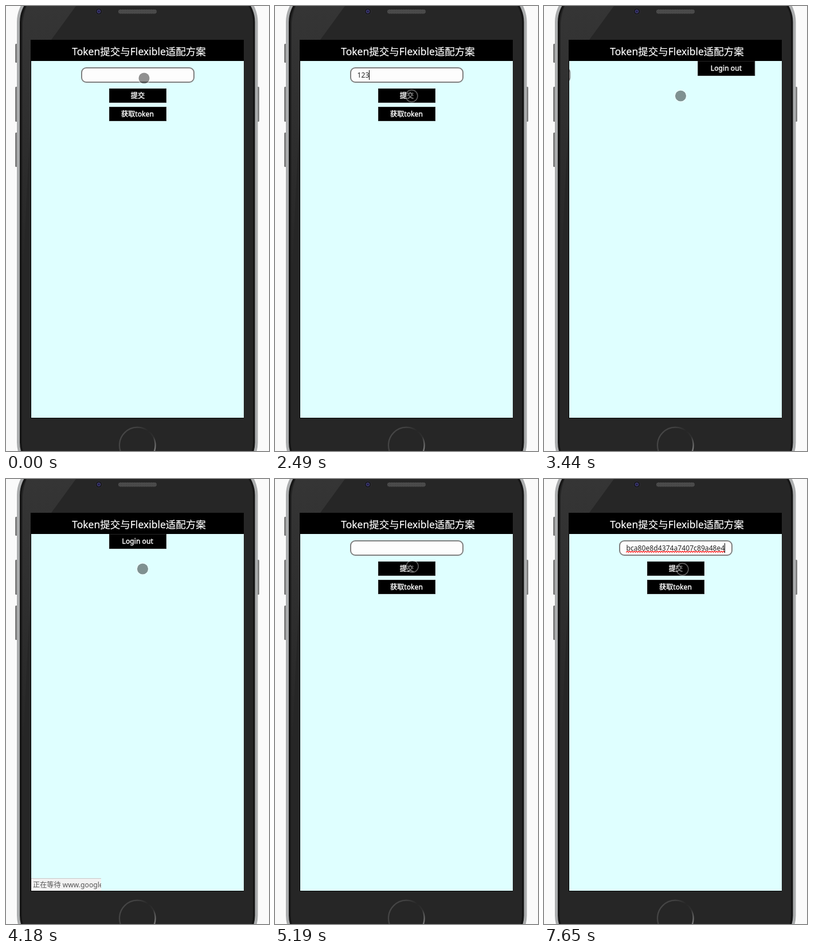
An HTML page that plays this animation: 459x777 px, repeating every 8 s.

```html
<!DOCTYPE html>
<html lang="zh">
<head>
<meta charset="utf-8">
<style>
html, body { margin: 0; width: 100%; height: 100%; overflow: hidden; background: #fafafa; }
svg { display: block; width: 459px; height: 777px; }
text { font: 12.15px "Noto Sans", "Noto Sans CJK SC", "Noto Sans CJK", sans-serif; white-space: pre; }
.title { font-size: 17.5px; fill: #fff; stroke: #fff; stroke-width: .2; text-anchor: middle; }
.button rect { fill: #000; stroke: #262626; }
.button text { fill: #fff; stroke: #fff; stroke-width: .4; text-anchor: middle; }
</style>
</head>
<body>
<svg viewBox="0 0 459 777">
  <defs>
    <linearGradient id="gloss" x1="0" y1="0" x2="0" y2="1">
      <stop stop-color="#353535"/><stop offset="1" stop-color="#262626"/>
    </linearGradient>
    <linearGradient id="ring" x1="0" y1=".15" x2="1" y2=".65">
      <stop stop-color="#484848"/><stop offset=".35" stop-color="#404040"/>
      <stop offset=".62" stop-color="#262626"/><stop offset=".8" stop-color="#303030"/>
      <stop offset="1" stop-color="#858585"/>
    </linearGradient>
    <pattern id="mesh" width="3" height="3" patternUnits="userSpaceOnUse">
      <path d="M0 0h3v3H0z" fill="#505050"/><path d="M0 0h1v1H0zM1.5 1.5h1v1h-1z" fill="#333"/>
    </pattern>
    <clipPath id="screen"><path d="M44 96H415V719H44z"/></clipPath>
    <clipPath id="statusBox"><path d="M44 697H166V719H44z"/></clipPath>
  </defs>

  <g fill="#7c7c7c">
    <rect x="16" y="66" width="5" height="33" rx="1.5"/>
    <rect x="16" y="141" width="5" height="61" rx="1.5"/>
    <rect x="16" y="221" width="5" height="60" rx="1.5"/>
    <rect x="438" y="141" width="4" height="61" rx="1.5"/>
  </g>
  <rect x="19" y="-34" width="420.5" height="858" rx="62" fill="#aaacad"/>
  <rect x="24" y="-29" width="410.5" height="848" rx="57" fill="#161616"/>
  <rect x="27.5" y="-26" width="403.5" height="842" rx="54" fill="#262626"/>
  <path d="M36 0H122L79 59L44 110V190Q37 300 34 380L29 480V30Q31 12 36 0" fill="url(#gloss)"/>
  <circle cx="162" cy="9.5" r="6" fill="#1b1b1f" stroke="#303034"/>
  <circle cx="162" cy="9.5" r="2.6" fill="#22204a" stroke="#4d4790"/>
  <rect x="196" y="6" width="67" height="7.5" rx="3.7" fill="url(#mesh)"/>
  <circle cx="229.3" cy="767" r="31.3" fill="none" stroke="url(#ring)" stroke-width="2.2"/>

  <path d="M43 59H415V720H43z"/>
  <path d="M44 96H415V719H44z" fill="#dfffff"/>
  <text class="title" x="232" y="86">Token提交与Flexible适配方案</text>

  <g clip-path="url(#screen)">
    <g id="pages">
      <rect x="132" y="108" width="196" height="25" rx="8" fill="#fdfdfd" stroke="#808080" stroke-width="2"/>
      <path id="squiggle" fill="none" stroke="#f00" stroke-width="1.2"/>
      <text id="field" x="143.5" y="125" fill="#222"></text>
      <path id="caret" d="M.5 112V129" stroke="#000"/>
      <g class="button"><rect x="180.5" y="144.5" width="99" height="24"/><text x="230" y="161">提交</text></g>
      <g class="button"><rect x="180.5" y="176.5" width="99" height="24"/><text x="229.5" y="193">获取token</text></g>
      <g class="button" transform="translate(371)"><rect x="180.5" y="96.5" width="99" height="25"/><text x="229.7" y="113">Login out</text></g>
    </g>
    <g id="status" clip-path="url(#statusBox)">
      <path d="M43 697.5H167V720H43z" fill="#f2f2f2" stroke="#c8c8c8"/>
      <text x="47" y="713" fill="#555">正在等待 www.google.com...</text>
    </g>
  </g>

  <g id="touch">
    <circle r="9.6" fill="#000" fill-opacity=".43"/>
    <circle r="10.4" fill="none" stroke="#fff" stroke-opacity=".36" stroke-width="1.6"/>
  </g>
</svg>
<script>
const LOOP = 8000, TICK = 136.6, BLINK = 530, SLIDE = 432, PAGE_WIDTH = 371;
const token = "bca80e8d4374a7407c89a48e4";

// Touch moves: from time, to time, destination x, y.
const start = [241, 126];
const moves = [[410, 1500, 238.5, 157], [5100, 5530, 249, 118], [6560, 7350, 241.5, 157.5]];

const $ = id => document.getElementById(id);
const show = (id, on) => $(id).setAttribute("visibility", on ? "visible" : "hidden");
const place = (id, x, y = 0) => $(id).setAttribute("transform", `translate(${x} ${y})`);

function ease(t, from, to) {
  const u = Math.min(1, Math.max(0, (t - from) / (to - from)));
  return u * u * (3 - 2 * u);
}

function touchAt(t) {
  return moves.reduce(([x, y], [from, to, toX, toY]) => {
    const k = ease(t, from, to);
    return [x + (toX - x) * k, y + (toY - y) * k];
  }, start);
}

function textAt(t) {
  if (t >= 6650) return token;
  return t < 4330 ? "123".slice(0, Math.max(0, Math.floor((t - 900) / 210))) : "";
}

function caretAt(t) {
  const focused = t >= 410 && t < 3200 || t >= 6010;
  const restart = [410, 1430, 6010, 6590].findLast(s => s <= t);
  return focused && Math.floor((t - restart) / BLINK) % 2 === 0;
}

$("squiggle").setAttribute("d", "M143.5 128" + "l2-2l2 2".repeat(43));

function draw() {
  const t = performance.now() % LOOP;
  const tick = Math.floor(t / TICK) * TICK;
  const text = textAt(t), field = $("field");
  if (field.textContent !== text) field.textContent = text;
  place("caret", 143 + Math.round(text ? field.getComputedTextLength() : 0));
  place("pages", -PAGE_WIDTH * (ease(tick, 3120, 3120 + SLIDE) - ease(tick, 4212, 4212 + SLIDE)));
  place("touch", ...touchAt(tick));
  show("caret", caretAt(t));
  show("squiggle", text === token);
  show("status", t >= 4180 && t < 4330);
  requestAnimationFrame(draw);
}
draw();
</script>
</body>
</html>
```
